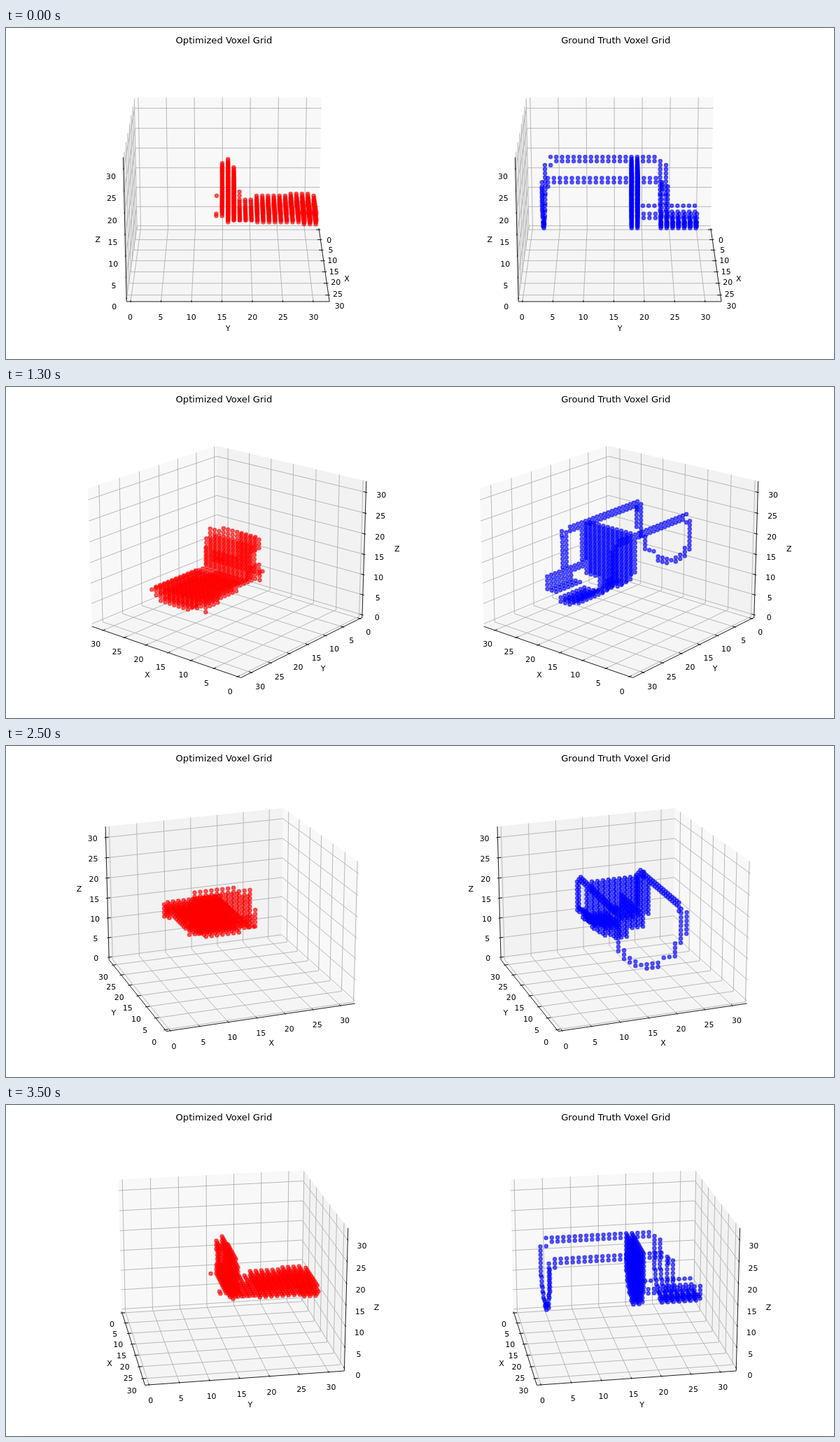
An HTML page with a canvas that plays this animation: 1183 by 473 pixels, repeating every 3.6 s.

```html
<!DOCTYPE html>
<html lang="en">
<head>
<meta charset="utf-8">
<title>Voxel grids</title>
<style>
html, body { margin: 0; width: 100%; height: 100%; overflow: hidden; background: #fff; }
canvas { display: block; }
</style>
</head>
<body>
<canvas id="stage" width="1183" height="473"></canvas>
<script>
const g = document.getElementById('stage').getContext('2d');
const LO = -2 / 3, HI = 32 + 2 / 3, MID = 16;
const UNIT = [1 / 28, 1 / 28, 0.75 / 28];   // world size of one voxel
const ELEV = Math.PI / 9, SE = Math.sin(ELEV), CE = Math.cos(ELEV);
const SCALE = 2336.5, CY = 239.2;
const TICKS = [0, 5, 10, 15, 20, 25, 30];
const FONT = '"DejaVu Sans", sans-serif';

// Adds every voxel of a box, bounds included.
function box(list, x0, x1, y0, y1, z0, z1) {
  for (let x = x0; x <= x1; x++)
    for (let y = y0; y <= y1; y++)
      for (let z = z0; z <= z1; z++) list.push([x, y, z]);
}

function redChair() {
  const v = [];
  for (let x = 10; x <= 20; x++) {
    const mid = x > 11 && x < 19, low = mid ? 11 : 12;
    // backrest, open at the x = 10 edge
    const parts = x === 10 ? [[low, 15], [19, 22]] : [[low, x < 18 ? 22 : 21]];
    for (const [a, b] of parts) {
      box(v, x, x, 16, 16, a, b);
      box(v, x, x, 17, 17, a, Math.min(b, x > 18 ? 19 : 20));
      if (x < 15) box(v, x, x, 15, 15, Math.max(a, 13), Math.min(b, 21));
    }
    if (x >= 15) box(v, x, x, 15, 15, 13, 15);
    // seat
    const top = x === 20 ? 12 : 13;
    box(v, x, x, 18, 20, low, 12);
    box(v, x, x, 21, 31, x === 20 ? 12 : 11, top);
    if (mid) box(v, x, x, 29, 31, 10, 10);
  }
  box(v, 10, 10, 18, 18, 13, 14);
  box(v, 9, 9, 27, 29, 11, 13);
  box(v, 9, 9, 30, 30, 10, 13);
  box(v, 9, 9, 16, 16, 12, 14);
  box(v, 21, 21, 16, 16, 12, 16);
  box(v, 10, 10, 14, 14, 13, 13);
  box(v, 19, 20, 14, 14, 13, 13);
  return v;
}

function blueChair() {
  const v = [];
  // U profile for x = 11 to 22: lowest and highest voxel
  const arc = [[14, 21], [12, 14], [11, 12], [10, 11], [10, 10], [9, 10],
               [9, 10], [9, 10], [11, 11], [11, 11], [11, 14], [14, 21]];
  arc.forEach(([a, b], i) => {
    const x = 11 + i;
    box(v, x, x, 3, 3, a, b);
    box(v, x, x, 23, 24, a, b);
    box(v, x, x, 18, 19, a, 23);
    if (x > 13 && x < 22) box(v, x, x, 25, 29, a, b);
  });
  for (const x of [11, 22]) {
    for (const [a, b] of [[4, 17], [20, 22]]) box(v, x, x, a, b, 23, 23);
    for (const [a, b] of [[5, 17], [20, 22]]) box(v, x, x, a, b, 22, 22);
    box(v, x, x, 23, 23, 22, 22);
    box(v, x, x, 4, 4, 21, 21);
  }
  box(v, 22, 22, 3, 4, 22, 22);
  box(v, 23, 23, 3, 3, 16, 21);
  box(v, 23, 23, 23, 23, 21, 22);
  box(v, 13, 13, 20, 22, 12, 12);
  box(v, 13, 13, 25, 29, 12, 12);
  box(v, 21, 21, 20, 22, 13, 14);
  return v;
}

const plots = [
  { cx: 317.2, title: 'Optimized Voxel Grid', color: '#ff000099', voxels: redChair() },
  { cx: 877.1, title: 'Ground Truth Voxel Grid', color: '#0000ff99', voxels: blueChair() }
];

function drawPlot({ cx, title, color, voxels }, az) {
  const c = Math.cos(az), s = Math.sin(az);

  function project(p) {
    const [x, y, z] = p.map((n, i) => (n - MID) * UNIT[i]);
    const fwd = x * c + y * s;
    const depth = 10 - fwd * CE - z * SE;
    return [cx + SCALE * (y * c - x * s) / depth,
            CY - SCALE * (z * CE - fwd * SE) / depth, depth];
  }
  const trace = pts => {
    g.beginPath();
    pts.forEach(p => g.lineTo(...project(p).slice(0, 2)));
  };
  const line = (...pts) => { trace(pts); g.stroke(); };
  const put = (p, i, n) => p.map((m, k) => k === i ? n : m);
  const outward = (p, i, d) => p.map((n, k) => k === i ? n : n + Math.sign(n - MID) * d);
  const label = (text, p, dy) => {
    const [x, y] = project(p);
    g.fillText(text, x, y + dy);
  };

  const front = [c > -1e-9 ? HI : LO, s > -1e-9 ? HI : LO, HI];
  const back = [LO + HI - front[0], LO + HI - front[1], LO];

  // panes
  ['#f8f8f8', '#f2f2f2', '#f5f5f5'].forEach((fill, i) => {
    const j = (i + 1) % 3, k = (i + 2) % 3;
    const a = put(back, j, front[j]);
    trace([back, a, put(a, k, front[k]), put(back, k, front[k])]);
    g.fillStyle = fill;
    g.fill();
  });

  // grid
  g.lineWidth = 0.88;
  g.strokeStyle = '#b0b0b0';
  for (let i = 0; i < 3; i++) {
    const j = (i + 1) % 3, k = (i + 2) % 3;
    for (const t of TICKS) {
      const p = put(back, i, t);
      line(put(p, j, front[j]), p, put(p, k, front[k]));
    }
  }

  // axes, ticks and labels
  g.strokeStyle = g.fillStyle = '#000';
  g.textAlign = 'center';
  g.font = '10.95px ' + FONT;
  const edges = [[0, front[1], LO], [front[0], 0, LO], [front[0], back[1], 0]];
  edges.forEach((edge, i) => {
    line(put(edge, i, LO), put(edge, i, HI));
    const dir = i === 0 ? 1 : 0, out = Math.sign(edge[dir] - MID);
    for (const t of TICKS) {
      const p = put(edge, i, t);
      line(put(p, dir, p[dir] + out * 0.267), put(p, dir, p[dir] - out * 0.533));
      label(t, outward(p, i, 1.865), 8.3);
    }
    label('XYZ'[i], outward(put(edge, i, MID), i, 4.054), 3);
  });

  // voxels, far ones first
  g.fillStyle = g.strokeStyle = color;
  g.lineWidth = 1.64;
  for (const [x, y] of voxels.map(project).sort((a, b) => b[2] - a[2])) {
    g.beginPath();
    g.arc(x, y, 2.45, 0, 2 * Math.PI);
    g.fill();
    g.stroke();
  }

  g.fillStyle = '#000';
  g.font = '13.14px ' + FONT;
  g.fillText(title, cx - 5.8, 22.4);
}

let shown = -1;
function frame(now) {
  const step = Math.floor(now % 3600 / 100);
  if (step !== shown) {
    shown = step;
    g.fillStyle = '#fff';
    g.fillRect(0, 0, 1183, 473);
    plots.forEach(p => drawPlot(p, step * Math.PI / 18));
  }
  requestAnimationFrame(frame);
}
requestAnimationFrame(frame);
</script>
</body>
</html>
```
